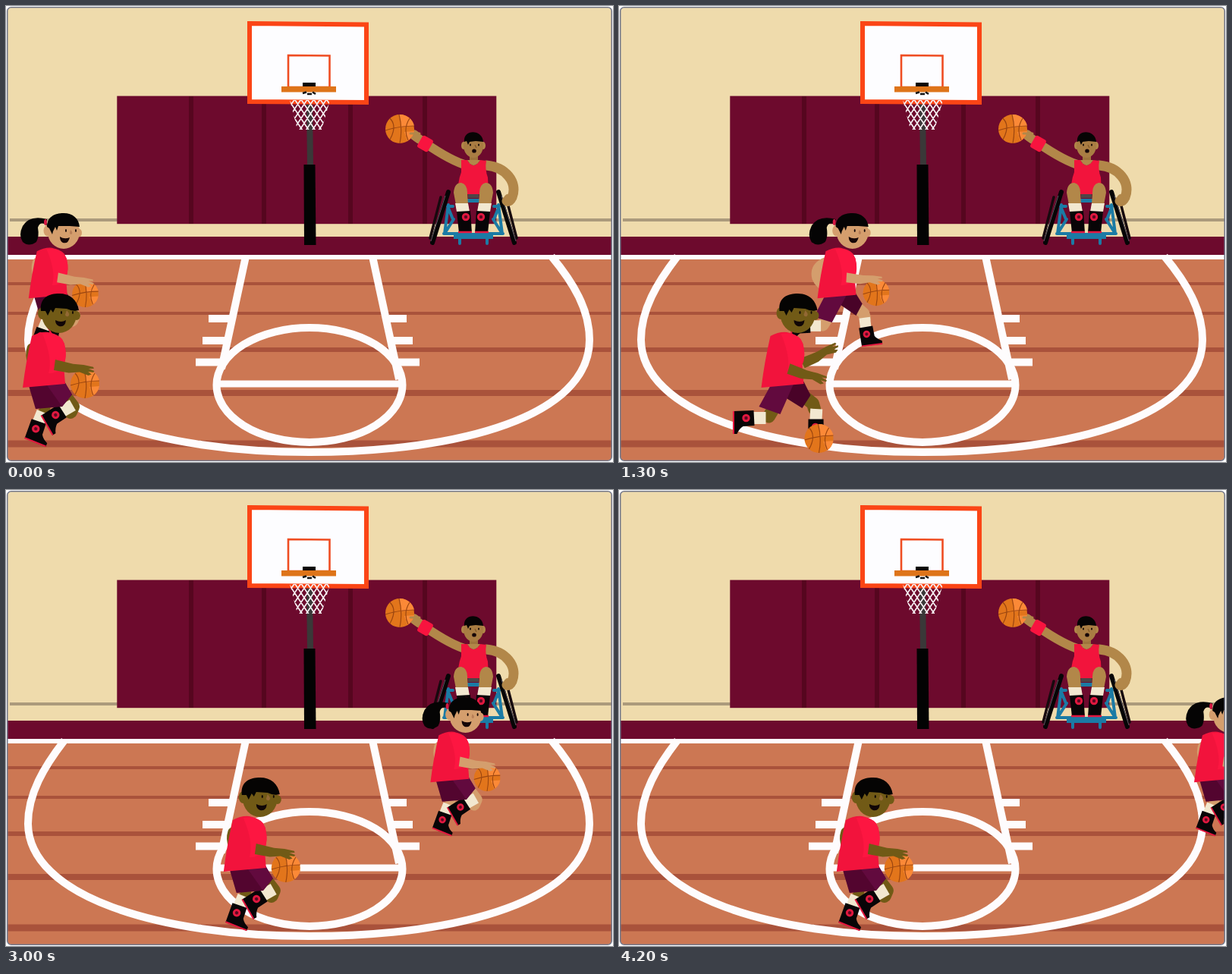
Recreate the animation shown at these times as an HTML page. Size 800 by 601 pixels, loop 4300 ms.

```html
<!DOCTYPE html>
<html lang="en">
<head>
<meta charset="utf-8">
<title>Basketball practice</title>
<style>
html, body { margin: 0; width: 100%; height: 100%; overflow: hidden; background: #fff; }
svg { display: block; width: 800px; height: 601px; }
</style>
</head>
<body>
<svg id="stage" viewBox="0 0 800 601" xmlns="http://www.w3.org/2000/svg"></svg>
<script>
const LOOP = 4300, TICK = 100, STRIDE = 33.1;
const RED = '#f8143f', CREAM = '#f2e8d0', MAROON = '#6d0a2d', BLUE = '#1b7ba5';

const path = (d, fill, extra = '') => `<path d="${d}" fill="${fill}" ${extra}/>`;
const line = (d, color, w, extra = '') => path(d, 'none', `stroke="${color}" stroke-width="${w}" ${extra}`);
const rect = (x, y, w, h, fill, extra = '') => `<rect x="${x}" y="${y}" width="${w}" height="${h}" fill="${fill}" ${extra}/>`;
const oval = (x, y, rx, ry, fill, extra = '') => `<ellipse cx="${x}" cy="${y}" rx="${rx}" ry="${ry}" fill="${fill}" ${extra}/>`;
const group = (transform, body, extra = '') => `<g transform="${transform}" ${extra}>${body}</g>`;
const badge = (x, y) => oval(x, y, 5.2, 5.2, '#e0183f') + oval(x, y, 2.2, 2.2, '#5d0922');
const ROUND = 'stroke-linecap="round" stroke-linejoin="round"';

function ball(x, y) {
  return group(`translate(${x} ${y})`,
    oval(0, 0, 19, 19, '#e2751b') +
    path('M2 -2 L-1 -19 A19 19 0 0 1 19 -4Z M6 4 L19 3 A19 19 0 0 1 10 16Z', '#fb8937') +
    line('M-19 2 Q0 -4 19 -4 M-1 -19 Q4 0 0 19 M-13 -14 Q-3 -4 -13 14 M13 -14 Q4 0 11 15', '#9c4610', 1.2));
}

// Sock and boot; the origin is where they meet, the toe points right.
function boot(x, y, turn, sock = 16) {
  return group(`translate(${x} ${y}) rotate(${turn})`,
    rect(-8, -sock, 16, sock + 2, CREAM) +
    path('M-10 0 L10 -1 L11 14 Q14 19 21 22 L21 27 L-9 27Z', '#080507') +
    line('M-9 26.5 L21 26.5', '#e5173f', 2) + badge(0, 10));
}

function arm(x1, y1, x2, y2, skin) {
  const deg = Math.atan2(y2 - y1, x2 - x1) * 180 / Math.PI;
  return group(`translate(${x1} ${y1}) rotate(${deg})`,
    path('M0 -7 L24 -4.5 L38 -5 L51 -4 L52 -2 L45 -1 L53 1 L52 3 L45 3 L50 6 L46 8 L34 5 L20 8 L0 7Z', skin));
}

const limb = (d, skin, w = 17) => line(d, skin, w, ROUND);
const shirt =
  path('M-36 30 Q-25 24 -14 25 Q2 28 7 40 Q11 58 6 68 L8 93 L-48 98 Q-44 65 -36 30Z', '#f2133c') +
  path('M-22 27 Q-5 24 4 34 Q14 55 3 72 Q-5 80 -14 79 Q-8 60 -22 27Z', '#fd1641');

// The four poses of the run, relative to the head.
const poses = [
  c => limb('M-36 46 Q-39 55 -35 64', c, 13) +
    limb('M-18 122 L-20 130', c, 14) + boot(-27, 143, 22, 14) +
    limb('M8 110 L18 123 L15 130', c, 18) + boot(4, 129, 60, 16) +
    path('M-41 92 L7 90 L17 107 L4 123 L-31 126Z', '#53052f') +
    path('M-18 92 L7 90 L17 107 L4 123Z', '#620a3e') + shirt + arm(-6, 68, 46, 75, c),
  c => arm(6, 66, 44, 46, c) +
    limb('M-32 126 L-38 136', c) + boot(-58, 138, 90) +
    limb('M6 108 L20 119 L22 126', c) + boot(24, 140, 3, 14) +
    path('M-14 90 L8 90 L17 108 L6 125 L-18 110Z', '#490328') +
    path('M-34 92 L-4 90 L-23 133 L-51 123Z', '#620a3e') + shirt + arm(-12, 73, 40, 88, c),
  c => limb('M-35 46 Q-38 55 -35 62', c, 12) +
    limb('M4 112 L7 122 L4 127', c, 15) + boot(3, 131, 42, 12) +
    limb('M-22 121 L-21 129', c, 14) + boot(-24, 144, 3) +
    path('M-45 92 L4 90 L12 108 L-2 126 L-34 126Z', '#620a3e') +
    path('M-12 91 L4 90 L12 108 L-2 126Z', '#490328') + shirt + arm(-6, 70, 46, 75, c),
  c => limb('M-34 46 Q-52 52 -48 68 Q-44 78 -34 80', c, 16) +
    limb('M-33 126 L-40 137', c) + boot(-59, 138, 90) +
    limb('M8 110 L19 120 L21 127', c) + boot(22, 140, -7, 14) +
    path('M-14 90 L7 90 L17 106 L8 123 L-14 108Z', '#490328') +
    path('M-36 92 L-4 90 L-27 133 L-53 125Z', '#620a3e') + shirt + arm(-6, 68, 48, 71, c)
];

const boyHead = c =>
  oval(-22, 0, 6, 8, c) + oval(0, 1, 23, 25, c) + oval(23, 3, 5, 6, c) +
  path('M-24 -3 C-26 -21 -13 -26 0 -26 C14 -26 24 -18 26 -4 Q18 -2 10 -6 L-5 -7 L-8 -1 L-11 -5 L-15 3 L-18 -3Z', '#050403') +
  path('M-5 9 Q3 13 9 9 Q8 19 0 17 Q-5 15 -5 9Z', '#100606') +
  oval(3, -1, 1.1, 2, '#100806') + oval(18, -1, 1, 2, '#100806') +
  path('M10 -4 Q15 1 12 4 Q9 5 8 2Z', '#936934');

const girlHead = c =>
  path('M-22 -9 Q-31 -15 -34 -6 Q-32 6 -36 13 Q-46 20 -54 13 Q-60 4 -54 -8 Q-45 -23 -22 -17Z', '#050404') +
  oval(-24, -13, 2, 4, '#d51842') +
  oval(-21, -2, 5.5, 7.5, c) + oval(0, 0, 21, 22, c) + oval(20, 1, 4, 5.5, c) +
  path('M-22 -7 C-22 -20 -12 -25 0 -25 C12 -25 20 -18 21 -7 L8 -8 L-7 -8 L-9 -2 L-11 -7 L-14 -1 L-15 3 L-19 -5Z', '#050404') +
  path('M-5 6 Q1 10 8 7 Q6 16 -1 14 Q-5 12 -5 6Z', '#160708') +
  oval(3, -2, 1, 1.9, '#160909') + oval(16, -2, 1, 1.9, '#160909') +
  path('M9 -3 Q13 1 10 3 Q8 3 8 1Z', '#b77e57');

const runners = {
  girl: {
    x: 76, y: 298, skin: '#d49e6d', head: girlHead, fit: 'translate(-2.5 -2) scale(.91)',
    balls: [[34, 92], [28, 152], [35, 117], [37, 90]],
    every: 190, lead: 100, last: 22
  },
  boy: {
    x: 70, y: 405, skin: '#715a16', head: boyHead, fit: '',
    balls: [[34, 93], [28, 165], [36, 134], [37, 90]],
    every: 260, lead: 70, last: 8
  }
};

function runner(id) {
  const r = runners[id];
  return `<g id="${id}">` +
    poses.map((pose, i) => group(r.fit, i === 0 || i === 3
      ? ball(...r.balls[i]) + pose(r.skin)
      : pose(r.skin) + ball(...r.balls[i]), 'class="pose"')).join('') +
    r.head(r.skin) + '</g>';
}

function court() {
  const boards = [[366, 4], [405, 4], [453, 6], [510, 8], [577, 9]];
  const marks = [[267, 412, 28], [259, 441, 30], [250, 469.5, 33], [505, 412, 23], [508, 441, 28], [514, 469.5, 31]];
  return rect(0, 0, 800, 601, '#efdbac') +
    rect(5, 280, 793, 4, '#ab9a7c') +
    rect(146.3, 118.6, 500, 168.6, MAROON) +
    [244, 340, 454, 552].map(x => rect(x - 3, 119, 6, 168, '#56061f')).join('') +
    rect(0, 304, 800, 24, MAROON) +
    rect(0, 333, 800, 268, '#cc7753') +
    boards.map(([y, h]) => rect(0, y - h / 2, 800, h, '#a9523b')).join('') +
    rect(0, 328, 800, 6, '#fefcfd') +
    line('M77 330 C50 365 29 400 29 440 C30 535 200 588 400 588 C600 588 769 540 769 440 C769 400 748 365 719 330 ' +
      'M316 330 L284 478 M483 330 L518 492', '#fefcfd', 10) +
    oval(400, 499.5, 122.5, 75.5, 'none', 'stroke="#fefcfd" stroke-width="10"') +
    line('M280 498 H520', '#fefcfd', 9) +
    marks.map(([x, y, w]) => rect(x, y - 5, w, 10, '#fefcfd')).join('');
}

function hoop() {
  let mesh = '';
  for (let x = 330; x < 470; x += 8.4) mesh += `M${x} 123 l28 42 M${x} 123 l-28 42 `;
  return path('M396 129 L404 129 L405 210 L397 210Z', '#3a3838') +
    path('M392.5 209 L407.5 209 L408.5 315 L393 315Z', '#030303') +
    path('M321 23 L475 24.5 L475 127 L321 126Z', '#fdfdff', 'stroke="#fb4516" stroke-width="6"') +
    path('M372 65 L426.5 65.5 L426.5 107 L372 107Z', 'none', 'stroke="#ef4d22" stroke-width="2.6"') +
    rect(391, 101, 17, 7, '#080808') + rect(363, 106, 72, 7.5, '#de7419') +
    line('M391 115 L396 113.5 M397 116 H403 M404 113.5 L408 116', '#111', 2.5) +
    line(mesh, '#f6eff2', 1.7, 'clip-path="url(#net)"');
}

function wheelchair() {
  const skin = '#b28749';
  const bothSides = body => body + group('translate(1232 0) scale(-1 1)', body);
  const chair =
    line('M589 264 H582 L589 281 M583 262 L578 300 L590 281 M577 300 H598 M598 306 V313', BLUE, 4, ROUND) +
    line('M583 245 L562 312', '#060506', 6, ROUND) + line('M573 252 L559 306', '#17090e', 3.5, ROUND) +
    line('M579 250 L560 310', '#5c5560', 1);
  const leg =
    path('M590 246 Q591 233 600 233 Q608 235 608 246 L609 262 L593 262Z', skin) +
    path('M592 260 H609 L611 271 H594Z', CREAM) +
    path('M594 271 L612 270 L614 299 H597Z', '#080507') +
    line('M596 298 H614', '#e41740', 2.5) + badge(606, 278);
  return rect(609, 246, 14, 7, '#4d4548') + rect(608, 254, 16, 5, BLUE) +
    bothSides(chair) + rect(590, 299, 52, 8, BLUE) +
    line('M633 210 C658 212 675 232 667 252 Q664 258 660 257', skin, 13, ROUND) +
    oval(661, 256, 5, 8, skin) +
    line('M604 209 Q580 201 540 172', skin, 12, ROUND) + oval(539, 170, 6, 8, skin, 'transform="rotate(-50 539 170)"') +
    ball(519, 162) + line('M533 168 L545 168 M535 174 L542 179', skin, 3, ROUND) +
    rect(-8, -9, 16, 18, RED, 'rx="3" transform="translate(552.5 181.5) rotate(30)"') +
    rect(611, 196, 11, 12, '#9e743c') +
    path('M600 203 L608 203 Q616 217 625 203 L633 204 Q631 215 635 226 L636 248 L596 248 Q595 232 600 219Z', '#f2143c') +
    path('M608 203 Q616 217 625 203Z', skin) +
    bothSides(leg) +
    oval(603, 184, 3, 5, skin) + oval(629, 184, 3, 5, skin) + oval(616, 184, 13, 16, '#a97d43') +
    path('M604 179 C602 162 628 162 629 179 L619 178 L611 179 L609 183 L607 178Z', '#060404') +
    oval(612, 183, 1, 1.6, '#170b07') + oval(623, 183, 1, 1.6, '#170b07') +
    line('M618 183 L620 187', '#805827', 1.3) + oval(617, 191, 2.8, 2.6, '#160707');
}

document.getElementById('stage').innerHTML =
  `<defs><clipPath id="frame"><rect x="2" y="2" width="796" height="597" rx="5"/></clipPath>
   <clipPath id="net"><path d="M374 124 L427 124 L416 163 L384 163Z"/></clipPath></defs>
   <g clip-path="url(#frame)">${court()}${hoop()}${wheelchair()}${runner('girl')}${runner('boy')}</g>` +
  rect(1.75, 1.75, 796.5, 597.5, 'none', 'rx="5" stroke="#74788a" stroke-width="1.6"');

const actors = Object.keys(runners).map(id => {
  const node = document.getElementById(id);
  return { ...runners[id], node, frames: [...node.querySelectorAll('.pose')] };
});

function draw(now) {
  const t = Math.floor((now % LOOP) / TICK) * TICK;
  for (const a of actors) {
    const step = Math.min(a.last, Math.floor((t + a.lead) / a.every));
    const pose = step === a.last ? 0 : step % 4;
    a.node.setAttribute('transform', `translate(${a.x + step * STRIDE} ${a.y})`);
    a.frames.forEach((f, i) => f.setAttribute('display', i === pose ? 'inline' : 'none'));
  }
}

const start = performance.now();
function loop() {
  draw(performance.now() - start);
  requestAnimationFrame(loop);
}
loop();
</script>
</body>
</html>
```
